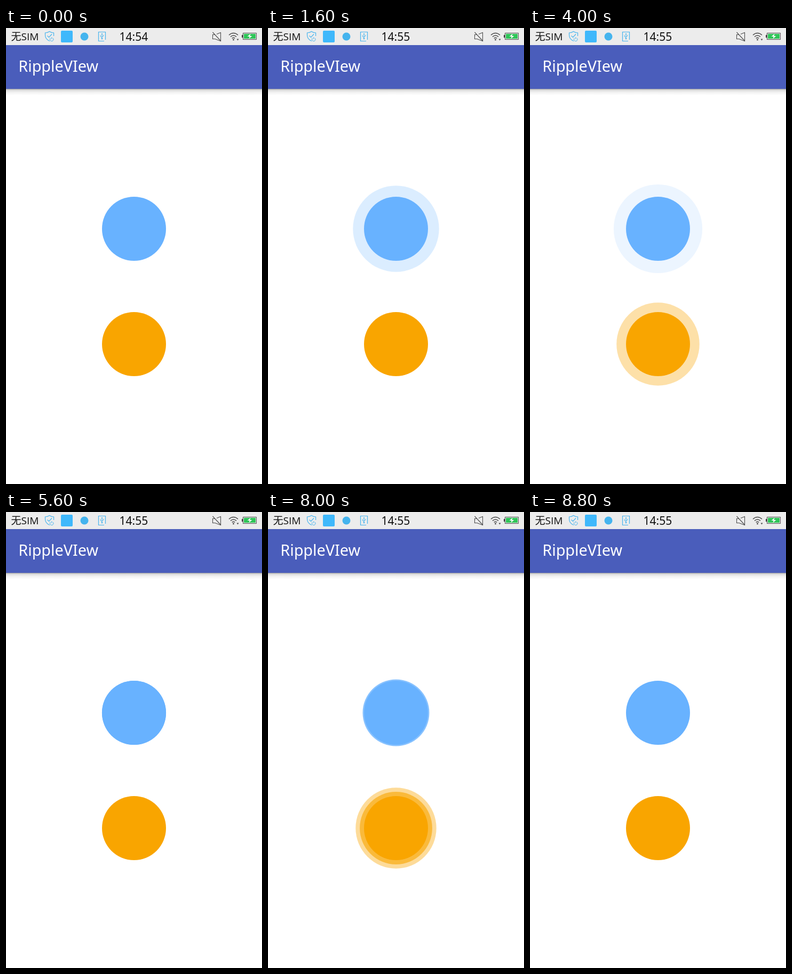
Recreate the animation shown at these times as an HTML page with a canvas. Size 480x854 px, loop 8.88 s.

```html
<!DOCTYPE html>
<html lang="zh">
<head>
<meta charset="utf-8">
<title>RippleVIew</title>
<style>
  html, body { margin: 0; width: 100%; height: 100%; overflow: hidden; background: #fff; }
  canvas { display: block; width: 480px; height: 854px; }
</style>
</head>
<body>
<canvas id="stage"></canvas>
<script>
const LOOP = 8880, STEP = 80, LIFE = 1000;
const BASE_R = 60, GROW = 24, CX = 240;
const SKY = '#45b4ee', INK = '#4b4b4b';

// Each ripple starts at `start`; `from` delays its first visible moment.
const buttons = [
  { y: 376, color: '#68b2ff', ripples: [
    { start: 840 }, { start: 3125 }, { start: 5560 }, { start: 7790 }] },
  { y: 592, color: '#f9a500', ripples: [
    { start: 3340 }, { start: 7400, from: 7680 }, { start: 7610, from: 7680 }] }
];

const canvas = document.getElementById('stage');
const ctx = canvas.getContext('2d');
const scale = window.devicePixelRatio || 1;
canvas.width = 480 * scale;
canvas.height = 854 * scale;
ctx.scale(scale, scale);

function disc(x, y, r, color) {
  ctx.fillStyle = color;
  ctx.beginPath();
  ctx.arc(x, y, r, 0, Math.PI * 2);
  ctx.fill();
}

function rect(x, y, w, h, color) {
  ctx.fillStyle = color;
  ctx.fillRect(x, y, w, h);
}

function roundBox(x, y, w, h, r, color) {
  ctx.fillStyle = color;
  ctx.beginPath();
  ctx.roundRect(x, y, w, h, r);
  ctx.fill();
}

function stroke(path, color, width = 1.2) {
  ctx.strokeStyle = color;
  ctx.lineWidth = width;
  ctx.stroke(new Path2D(path));
}

function text(str, x, y, font, color) {
  ctx.font = font;
  ctx.fillStyle = color;
  ctx.fillText(str, x, y);
}

function drawShield() {
  stroke('M82 24.5 C76 22 73.5 18 73.5 13 V9 Q78 9 81.5 6.5 Q85 9 89.5 9 V15', SKY);
  stroke('M77.5 14.5 L80.5 17.5 L86 11.5', SKY);
  stroke('M83.8 18.6 A3.3 3.3 0 1 0 87.6 18.6 M85.7 17.2 V20.8', SKY, 1);
}

function drawUsb() {
  stroke('M186.5 22 V7.5 H173.5 V24.5 H184', SKY);
  stroke('M180 20 V11 M180 18 L177.3 16 V13.5 M180 16.5 L182.7 15 V13', SKY, 1);
  disc(180, 20, 1.3, SKY);
  disc(180, 11, 1.1, SKY);
}

function drawMute() {
  stroke('M392 12.5 H387.5 V20.5 H392 L402.5 24.5 V8.5 L395 11.5', INK, 1.1);
  stroke('M387.5 8 L403 24.5', INK, 1.1);
}

function drawWifi() {
  stroke('M418 13.2 Q426.5 5.8 435 13.2', INK, 1.5);
  stroke('M421 16.4 Q426.5 11.6 432 16.4', INK, 1.5);
  stroke('M423.8 19.4 Q426.5 17.2 429.2 19.4', INK, 1.5);
  disc(426.5, 22, 1.4, INK);
  ctx.fillStyle = INK;
  ctx.fill(new Path2D('M432.5 20.5 H436.5 L434.5 23.5 Z'));
}

function drawBattery() {
  stroke('M444.5 9.5 H469.5 V21.5 H444.5 Z', INK, 1);
  rect(442, 13, 2, 5, INK);
  rect(446, 11, 22, 9, '#2fc558');
  ctx.fillStyle = '#fff';
  ctx.fill(new Path2D('M458.5 11 L452.5 16 H456.5 L455.5 20 L461.5 15 H457.5 Z'));
}

function drawStatusBar(clock) {
  rect(0, 0, 480, 32, '#ececec');
  text('无', 9.5, 23, '19px "Noto Sans CJK SC", "Noto Sans CJK", sans-serif', '#111');
  text('SIM', 28.5, 23, '19px "Open Sans", sans-serif', '#111');
  drawShield();
  roundBox(103, 5, 22, 22, 2, '#3fb8fb');
  disc(147, 16, 7.5, SKY);
  drawUsb();
  text(clock, 212.5, 23.5, '21px "Noto Sans", sans-serif', '#111');
  drawMute();
  drawWifi();
  drawBattery();
}

function drawAppBar() {
  const shade = ctx.createLinearGradient(0, 114, 0, 126);
  shade.addColorStop(0, 'rgba(0,0,0,.36)');
  shade.addColorStop(.2, 'rgba(0,0,0,.13)');
  shade.addColorStop(.55, 'rgba(0,0,0,.05)');
  shade.addColorStop(1, 'rgba(0,0,0,0)');
  rect(0, 114, 480, 12, shade);
  rect(0, 32, 480, 82, '#4a5dbb');
  text('RippleVIew', 23.3, 82, '28.8px "Noto Sans", sans-serif', '#fff');
}

function drawButton({ y, color, ripples }, time) {
  for (const { start, from = start } of ripples) {
    const p = (time - start) / LIFE;
    if (time < from || p >= 1) continue;
    const eased = (1 - Math.cos(p * Math.PI)) / 2;
    ctx.globalAlpha = 1 - p;
    disc(CX, y, BASE_R + GROW * eased, color);
  }
  ctx.globalAlpha = 1;
  disc(CX, y, BASE_R, color);
}

function draw(now) {
  const time = Math.floor((now % LOOP) / STEP) * STEP;
  rect(0, 0, 480, 854, '#fff');
  drawStatusBar(time < 560 ? '14:54' : '14:55');
  drawAppBar();
  for (const button of buttons) drawButton(button, time);
}

let origin;
function tick(now) {
  origin ??= now;
  draw(Math.max(0, now - origin));
  requestAnimationFrame(tick);
}
requestAnimationFrame(tick);
</script>
</body>
</html>
```
